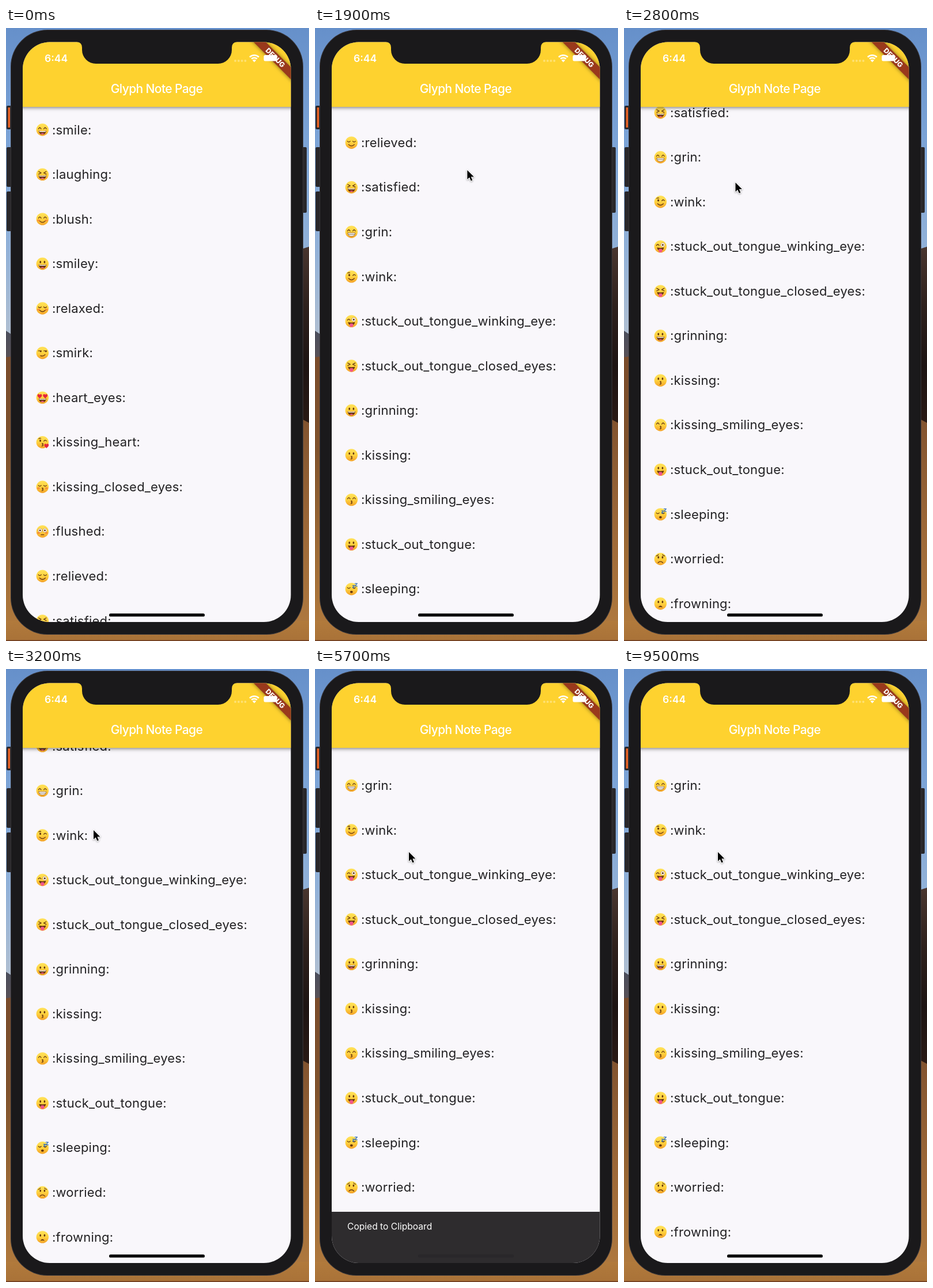
An HTML page with a canvas that plays this animation: 526x1065 px, repeating every 9.6 s.

```html
<!DOCTYPE html>
<html lang="en">
<head>
<meta charset="utf-8">
<title>Emoji list</title>
<style>
html, body { margin: 0; width: 100%; height: 100%; overflow: hidden; background: #1a191b; }
canvas { display: block; width: 526px; height: 1065px; }
</style>
</head>
<body>
<canvas id="stage"></canvas>
<script>
const W = 526, H = 1065, LOOP = 9600, STEP = 100;
const ROW = 77.55, FIRST_ROW = 176.5;
const canvas = document.getElementById('stage');
const ctx = canvas.getContext('2d');
const ratio = window.devicePixelRatio || 1;
canvas.width = W * ratio;
canvas.height = H * ratio;

const INK = '#65370f', RED = '#e5263c', PINK = '#f2568a';
const HEART = 'q-4.4-3-3.6-5.6q1.4-2.6 3.6 0q2.2-2.6 3.6 0q.8 2.6-3.6 5.6z';
const dot = (x, y, rx, ry = rx) =>
  `M${x - rx} ${y}a${rx} ${ry} 0 1 0 ${2 * rx} 0a${rx} ${ry} 0 1 0 ${-2 * rx} 0z`;

// Each part is a list of layers: [path, fill, stroke].
const parts = {
  arched: [['M-6.8-1.5q2.2-4.6 4.4 0M2.4-1.5q2.2-4.6 4.4 0', '', INK]],
  closed: [['M-7-2.5q2.4 3 4.8 0M2.2-2.5q2.4 3 4.8 0', '', INK]],
  squint: [['M-6.6-5l4.4 2.4-4.4 2.2M6.6-5l-4.4 2.4 4.4 2.2', '', INK]],
  dots: [[dot(-3.6, -2.8, 1.4, 2.1) + dot(3.6, -2.8, 1.4, 2.1), INK]],
  sly: [['M-7-3.6h5M2.4-3.6h5', '', INK], [dot(-3, -2.6, 1.3) + dot(6, -2.6, 1.3), INK]],
  hearts: [['M-4.8 1' + HEART + 'M4.8 1' + HEART, RED, RED]],
  wide: [[dot(-4.2, -2, 3.5) + dot(4.2, -2, 3.5), '#fff', '#b67b25'],
         [dot(-4.2, -2, 1.6) + dot(4.2, -2, 1.6), INK]],
  winking: [[dot(-3.8, -2.6, 1.5, 2), INK], ['M2.4-1.8q2.2-3.4 4.6-.2M-6.4-6q2-1.5 3.6-.6', '', INK]],
  zany: [['M-7-1.8q2.4-3.6 4.6 0', '', INK], [dot(4, -2.8, 3.6), '#fff', '#b67b25'],
         [dot(4, -2.8, 1.6), INK]],
  open: [['M-6.6 1.4q6.6 1.4 13.2 0q-.6 6.8-6.6 6.8t-6.6-6.8z', INK],
         ['M-5.8 1.8q5.8 1 11.6 0l-.4 1.8h-10.8z', '#fff'],
         ['M-3 7q3-2.6 6 0q-3 1.8-6 0z', PINK]],
  teeth: [['M-6.4 1.6h12.8q0 5.8-6.4 5.8t-6.4-5.8z', '#fff', INK], ['M-5.6 4.2h11.2', '', '#9b8a79']],
  smile: [['M-5 3.2q5 5 10 0', '', INK]],
  smirk: [['M-3.4 4.8q5 1.6 8-2', '', INK]],
  kiss: [['M-.8 2q3.4.2.6 2.2q3.2 1.2-.8 2.6', '', INK]],
  flat: [['M-2.4 5.6h4.8', '', INK]],
  tongue: [['M-6 1.6q6 1.4 12 0q-.8 5.6-6 5.6t-6-5.6z', INK],
           ['M-3 4.6q3-1.6 6 0v2.8q0 2.8-3 2.8t-3-2.8z', PINK]],
  gape: [[dot(0, 5, 2.4, 2), INK]],
  frown: [['M-4.2 6.6q4.2-4.4 8.4 0', '', INK]],
  ajar: [['M-3.8 6.6q3.8-6 7.6 0q-3.8-1.4-7.6 0z', INK]],
  brows: [['M-7.2-5.2q2.4-.4 3.6-2.4M7.2-5.2q-2.4-.4-3.6-2.4', '', INK]],
  blush: [[dot(-7, 2.4, 2.6, 1.8) + dot(7, 2.4, 2.6, 1.8), 'rgba(243,95,57,.5)']],
  heart: [['M7 9.8' + HEART, RED, RED]],
  zzz: [['M2-6h3l-3 3.6h3M6-9.6h4l-4 4.6h4', '', '#3b72b8']]
};

const rows = `smile arched open
laughing squint open
blush arched smile blush
smiley dots open
relaxed closed smile blush
smirk sly smirk
heart_eyes hearts open
kissing_heart winking kiss heart
kissing_closed_eyes closed kiss blush
flushed wide flat blush
relieved closed smile
satisfied squint open
grin arched teeth
wink winking smile
stuck_out_tongue_winking_eye zany tongue
stuck_out_tongue_closed_eyes squint tongue
grinning dots open
kissing dots kiss
kissing_smiling_eyes arched kiss
stuck_out_tongue dots tongue
sleeping closed gape zzz
worried dots frown brows
frowning dots ajar`.split('\n').map(line => {
  const [name, ...look] = line.split(' ');
  const layers = look.flatMap(part => parts[part])
    .map(([d, fill, stroke]) => [new Path2D(d), fill, stroke]);
  return { label: `:${name}:`, layers };
});

const clamp = x => Math.min(1, Math.max(0, x));
const smooth = x => x * x * (3 - 2 * x);

function gradient(y0, y1, ...stops) {
  const g = ctx.createLinearGradient(0, y0, 0, y1);
  stops.forEach((color, i) => g.addColorStop(i / (stops.length - 1), color));
  return g;
}

function rect(x, y, w, h, color, radius = 0) {
  ctx.fillStyle = color;
  ctx.beginPath();
  ctx.roundRect(x, y, w, h, radius);
  ctx.fill();
}

function shape(d, color) {
  ctx.fillStyle = color;
  ctx.fill(new Path2D(d));
}

function text(str, x, y, size, color, { weight = 400, spacing = 0, align = 'left' } = {}) {
  ctx.font = `${weight} ${size}px Inter, sans-serif`;
  ctx.letterSpacing = spacing + 'px';
  ctx.textAlign = align;
  ctx.fillStyle = color;
  ctx.fillText(str, x, y);
}

// Short drag, then a fling whose remaining distance decays exponentially.
function scrollAt(t) {
  if (t < 900) return 0;
  if (t < 1200) return 242 * ((t - 900) / 300) ** 1.6;
  return t < 4000 ? 906 - 539 * Math.exp(-2.1 * (t - 1300) / 1000) : 905;
}

const cursorPath = [
  [500, 440, 620], [900, 325, 478], [1200, 305, 240], [1300, 303, 234], [2400, 235, 257],
  [3200, 152, 280], [3700, 118, 277], [4300, 118, 277], [5000, 163, 318], [LOOP, 163, 318]
];

function cursorAt(t) {
  const i = cursorPath.findIndex(key => t < key[0]);
  if (i < 1) return null;
  const [t0, x0, y0] = cursorPath[i - 1], [t1, x1, y1] = cursorPath[i];
  const k = smooth((t - t0) / (t1 - t0));
  return [x0 + (x1 - x0) * k, y0 + (y1 - y0) * k];
}

function drawDesktop() {
  rect(0, 0, W, H, gradient(0, 570, '#6690ca', '#7ba3d6', '#91b1d8', '#b8c3d0'));
  shape('M0 526l12 8v60H0z', gradient(526, 580, '#4b4e5c', '#5b5257'));
  shape('M0 572l30-4V1065H0z', gradient(570, 1065, '#7a4c2c', '#80532d', '#9c6a36', '#b47c3e'));
  shape('M500 388l26-8V690H500z', gradient(380, 690, '#49362f', '#2e211d', '#1d1413', '#2a1a15'));
  shape('M500 672l26 14V1065H500z', gradient(670, 1065, '#80522f', '#9c6838', '#b17b40'));
  rect(0, 1030, W, 35, gradient(1030, 1065, '#b17a3c', '#a97238'));
  rect(0, 1063.5, W, 1.5, '#6a381e');
}

function drawPhoneBody() {
  rect(1, 135, 10, 41, '#29272a', 2);
  rect(3.5, 138, 3.5, 35, '#ed6425', 1);
  rect(1, 207, 10, 69, '#29272a', 2);
  rect(1, 284, 10, 69, '#29272a', 2);
  rect(512, 207, 10, 114, '#29272a', 2);
  rect(8, 3, 508, 1051, '#38363a', 64);
  rect(9, 4, 506, 1049, '#1a191b', 63);
}

function drawFace(layers, x, y) {
  ctx.save();
  ctx.translate(x, y);
  rect(-10.7, -10.7, 21.4, 21.4, gradient(-11, 11, '#ffe25a', '#ffd23f', '#f3a027'), 10.7);
  ctx.lineWidth = 1.3;
  ctx.lineCap = ctx.lineJoin = 'round';
  for (const [path, fill, stroke] of layers) {
    if (fill) { ctx.fillStyle = fill; ctx.fill(path); }
    if (stroke) {
      ctx.strokeStyle = stroke;
      ctx.lineWidth = fill ? 0.6 : 1.3;
      ctx.stroke(path);
    }
  }
  ctx.restore();
}

function drawList(scroll) {
  rect(29, 24, 466, 1009, '#f9f7fb');
  rows.forEach(({ label, layers }, i) => {
    const y = FIRST_ROW + ROW * i - scroll;
    if (y < 100 || y > 1060) return;
    drawFace(layers, 63.3, y + 0.3);
    text(label, 80, y + 8, 22, '#222123', { spacing: 0.2 });
  });
}

function drawBanner() {
  ctx.save();
  ctx.translate(494, 25);
  ctx.rotate(Math.PI / 4);
  ctx.shadowColor = 'rgba(0,0,0,.5)';
  ctx.shadowBlur = 7 * ratio;
  rect(-60, 30, 120, 15, '#99391c');
  ctx.shadowColor = 'transparent';
  text('DEBUG', 0, 41.8, 12, '#fff', { weight: 800, align: 'center' });
  ctx.restore();
}

function drawStatusIcons() {
  for (let i = 0; i < 4; i++) rect(396 + i * 5.8, 55, 4, 4, 'rgba(255,255,255,.32)', 2);
  ctx.strokeStyle = '#fff';
  ctx.lineWidth = 2.6;
  ctx.lineCap = 'butt';
  for (const r of [6.8, 11.2]) {
    ctx.beginPath();
    ctx.arc(431, 58.5, r, -Math.PI * 0.75, -Math.PI * 0.25);
    ctx.stroke();
  }
  shape('M431 59.5l-3.2-3.4q3.2-2.6 6.4 0z', '#fff');
  rect(447.5, 47, 23, 10.5, '#fff', 2.5);
}

function drawAppBar() {
  ctx.save();
  ctx.shadowColor = 'rgba(0,0,0,.45)';
  ctx.shadowBlur = 6 * ratio;
  ctx.shadowOffsetY = 2 * ratio;
  rect(20, 20, 484, 117, '#fed22f');
  ctx.restore();
  text('Glyph Note Page', 261.5, 113, 21, '#fff', { weight: 500, spacing: -0.6, align: 'center' });
  text('6:44', 67, 59, 17.5, '#fff', { weight: 600 });
  drawBanner();
  drawStatusIcons();
}

function drawSnackbar(t) {
  const entering = clamp((t - 3850) / 250), leaving = clamp((t - 8100) / 250);
  const linear = entering - leaving;
  if (linear > 0) {
    const top = 1032 - 89 * (1 - (1 - linear) ** 2.3);
    rect(29, top, 466, 1033 - top, '#2e2c2e');
    ctx.globalAlpha = clamp((linear - 0.6) / 0.4);
    text('Copied to Clipboard', 56, top + 30.5, 15.6, '#fff');
    ctx.globalAlpha = 1;
  }
  rect(179, 1017.3, 166, 5.2, linear > 0 ? '#29272a' : '#000', 2.6);
}

function drawCursor(position) {
  if (!position) return;
  ctx.save();
  ctx.translate(...position);
  const arrow = new Path2D('M0 0v16l3.7-3.5 2.6 6 2.7-1.1-2.6-6h5.1z');
  ctx.shadowColor = 'rgba(0,0,0,.35)';
  ctx.shadowBlur = 3 * ratio;
  ctx.shadowOffsetY = ratio;
  ctx.strokeStyle = '#fff';
  ctx.lineWidth = 2.2;
  ctx.lineJoin = 'round';
  ctx.stroke(arrow);
  ctx.shadowColor = 'transparent';
  ctx.fillStyle = '#000';
  ctx.fill(arrow);
  ctx.restore();
}

function draw(now) {
  const t = Math.floor(now % LOOP / STEP) * STEP;
  ctx.setTransform(ratio, 0, 0, ratio, 0, 0);
  drawDesktop();
  drawPhoneBody();
  ctx.save();
  ctx.beginPath();
  ctx.roundRect(29, 24.5, 465.5, 1007.5, 47);
  ctx.clip();
  drawList(scrollAt(t));
  drawAppBar();
  drawSnackbar(t);
  ctx.restore();
  shape('M123 24q9 1 9 10v4a24 24 0 0 0 24 24h212a24 24 0 0 0 24-24v-4q0-9 9-10z', '#1a191b');
  drawCursor(cursorAt(t));
}

const start = performance.now();
function tick() {
  draw(performance.now() - start);
  requestAnimationFrame(tick);
}
tick();
</script>
</body>
</html>
```
